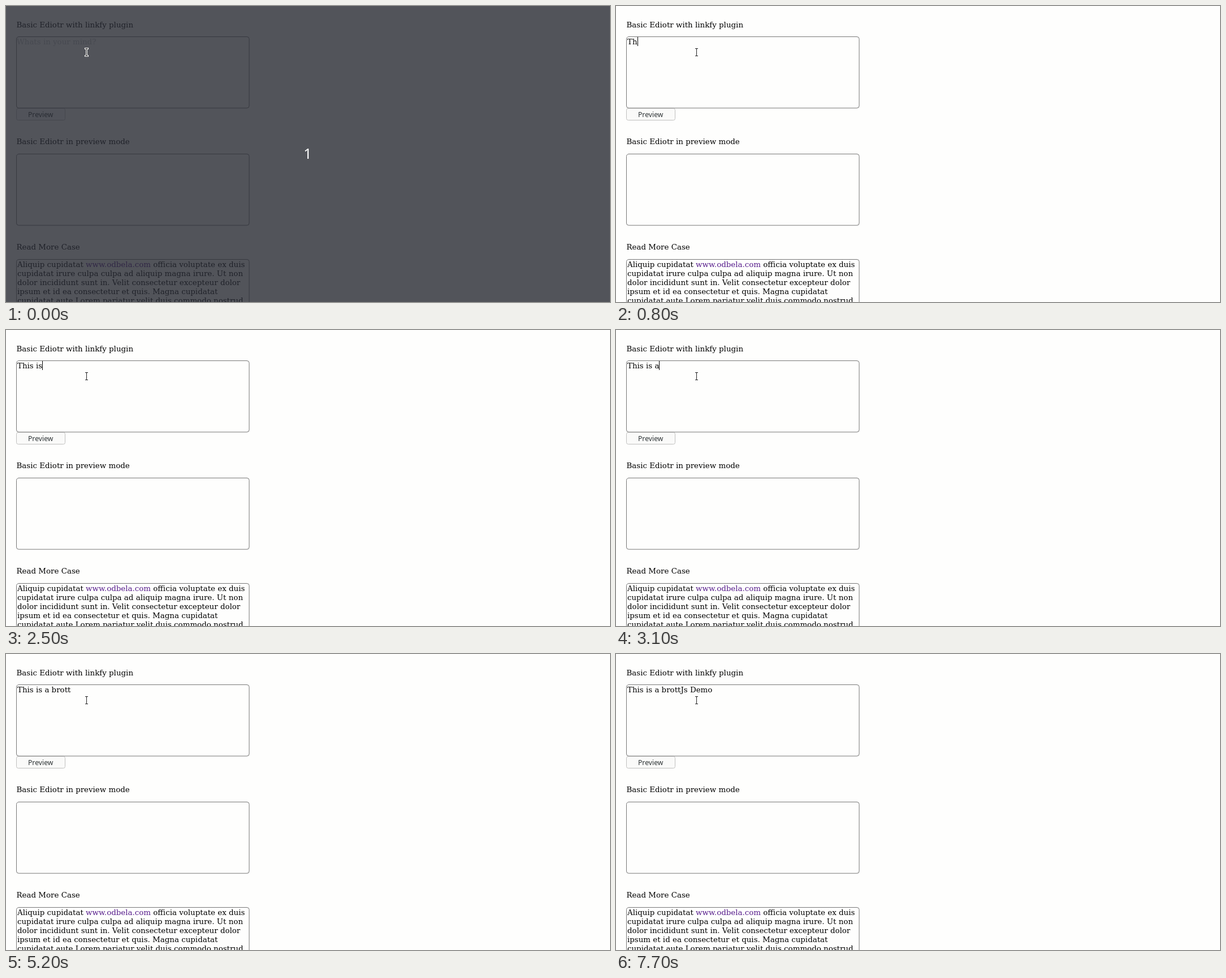
Animation, 1068 px wide and 525 px high, one loop 8000 ms. Source, as an HTML page with a canvas:

```html
<!DOCTYPE html>
<html lang="en">
<head>
<meta charset="utf-8">
<title>Editor demo</title>
<style>
  html, body { margin: 0; width: 100%; height: 100%; overflow: hidden; background: #fefefd; }
  canvas { display: block; }
</style>
</head>
<body>
<canvas id="stage" width="1068" height="525"></canvas>
<script>
const ctx = document.getElementById('stage').getContext('2d');
const LOOP = 8000;
const TICK = 100;
const SERIF = '13.4px "DejaVu Serif", serif';

// The first two bursts add two letters each, then one letter per stroke.
const STROKES = ['Th', 'is', ...' is a brottJs Demo'];

// Typing rhythm as [ms, strokes], even in between.
const RHYTHM = [[800, 1], [1500, 2], [3100, 7], [4600, 13], [5300, 14], [6600, 17], [7700, 20]];

const PARAGRAPH = [
  'cupidatat irure culpa culpa ad aliquip magna irure. Ut non',
  'dolor incididunt sunt in. Velit consectetur excepteur dolor',
  'ipsum et id ea consectetur et quis. Magna cupidatat',
  'cupidatat aute Lorem pariatur velit duis commodo nostrud'
];

// Draws text and returns the x where it ends.
function text(str, x, y, color = '#000', font = SERIF) {
  ctx.font = font;
  ctx.fillStyle = color;
  ctx.fillText(str, x, y);
  return x + ctx.measureText(str).width;
}

function box(x, y, w, h, r, stroke, fill = 'transparent') {
  ctx.beginPath();
  ctx.roundRect(x, y, w, h, r);
  ctx.fillStyle = fill;
  ctx.fill();
  ctx.lineWidth = 1;
  ctx.strokeStyle = stroke;
  ctx.stroke();
}

function page() {
  ctx.fillStyle = '#fefefd';
  ctx.fillRect(0, 0, 1068, 525);

  text('Basic Ediotr with linkfy plugin', 18.5, 38);
  text('Basic Ediotr in preview mode', 18.5, 245);
  text('Read More Case', 18.5, 432);

  box(18.5, 181.5, 86, 21, 3, '#c0c0bf', '#fafaf9');
  text('Preview', 39, 197, '#2e3436', '12.2px "Noto Sans", sans-serif');
  for (const y of [54.5, 262.5, 449.5]) box(18.5, y, 411.5, 126.5, 4, '#777');

  let x = text('Aliquip cupidatat ', 20, 463);
  x = text('www.odbela.com', x, 463, '#551a8b');
  text(' officia voluptate ex duis', x, 463);
  PARAGRAPH.forEach((line, i) => text(line, 20, 479 + 16 * i));
}

function strokesAt(t) {
  const next = RHYTHM.findIndex(([time]) => time > t);
  if (next === 0) return 0;
  if (next < 0) return STROKES.length;
  const [t0, n0] = RHYTHM[next - 1], [t1, n1] = RHYTHM[next];
  return Math.floor(n0 + (n1 - n0) * (t - t0) / (t1 - t0));
}

function editor(t) {
  // The screen refreshes once per tick and shows the keys pressed near it.
  const count = strokesAt(Math.floor(t / TICK) * TICK + 40);
  if (t < 600) text('Whats in your mind?', 19, 68, '#c2c5c3');
  const end = text(STROKES.slice(0, count).join(''), 20, 68);

  const phase = t % 1200;
  const blinkedOff = count > 0 && phase >= 400 && phase < 700;
  if (t >= 400 && !blinkedOff) {
    ctx.fillStyle = '#000';
    ctx.fillRect(Math.round(end), 55, 1, 16);
  }
}

function countdown() {
  ctx.fillStyle = 'rgba(39, 42, 51, 0.8)';
  ctx.fillRect(0, 0, 1068, 525);
  ctx.textAlign = 'center';
  text('1', 533.5, 271, '#fff', '25px "Noto Sans", sans-serif');
  ctx.textAlign = 'left';
}

function pointer() {
  ctx.beginPath();
  for (const y of [75.5, 88.5]) {
    ctx.moveTo(140.5, y);
    ctx.lineTo(144.5, y);
  }
  ctx.moveTo(142.5, 75.5);
  ctx.lineTo(142.5, 88.5);
  ctx.lineCap = 'square';
  for (const [width, color] of [[3, '#fff'], [1, '#222']]) {
    ctx.lineWidth = width;
    ctx.strokeStyle = color;
    ctx.stroke();
  }
}

const origin = performance.now();
function draw() {
  const t = (performance.now() - origin) % LOOP;
  page();
  editor(t);
  if (t < 100) countdown();
  pointer();
  requestAnimationFrame(draw);
}
draw();
</script>
</body>
</html>
```
